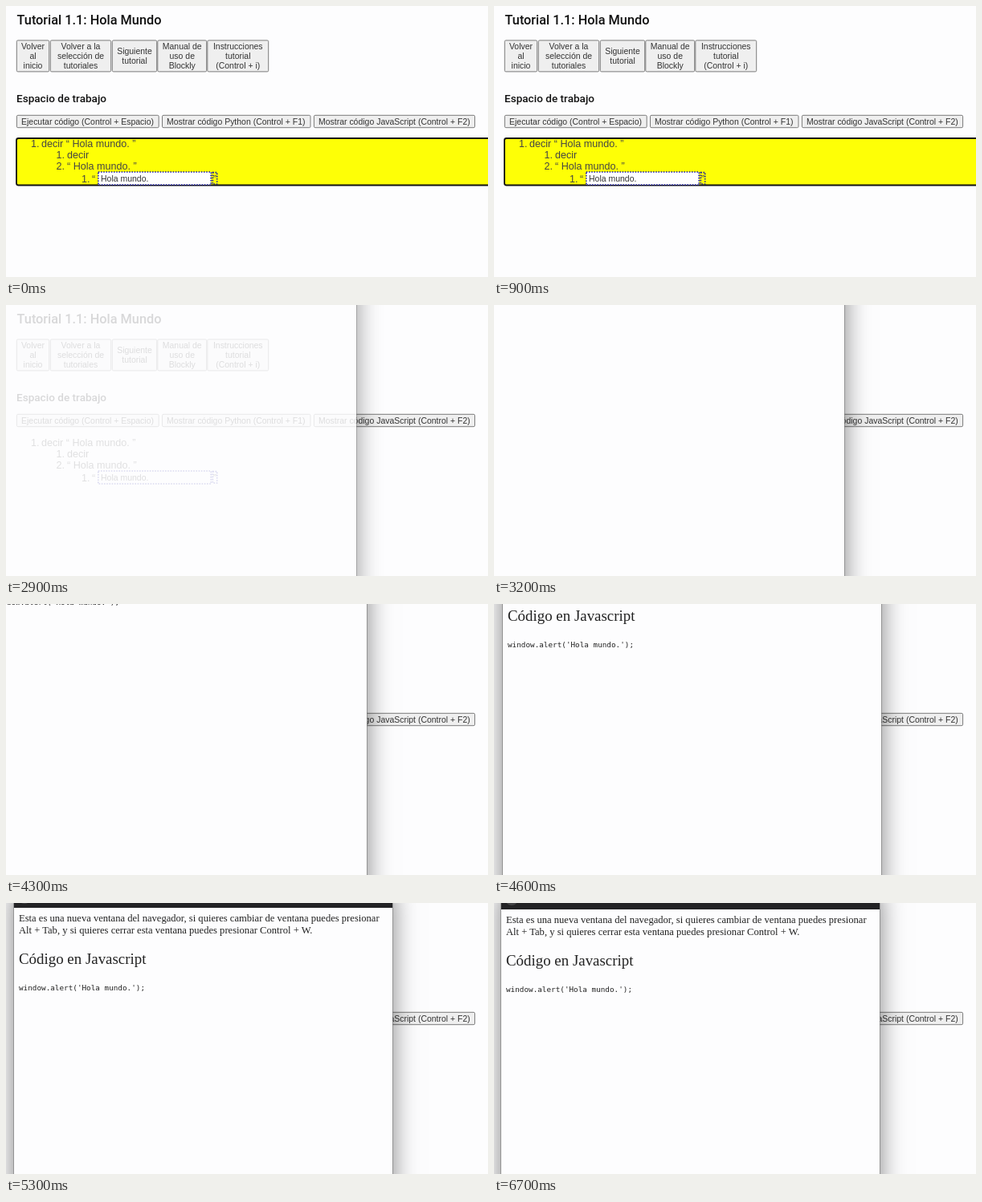
These frames come from a looping animation (600 px wide and 338 px high, 8000 ms). An HTML page:

```html
<!DOCTYPE html>
<html lang="es">
<head>
<meta charset="utf-8">
<title>Hola Mundo</title>
<style>
  html, body { margin: 0; width: 100%; height: 100%; overflow: hidden; background: #fdfdfe; }
  #stage { position: relative; width: 600px; height: 338px; overflow: hidden; background: #fdfdfe; }
  svg { position: absolute; left: 0; top: 0; overflow: visible; }
  text { white-space: pre; }
  .title { font-family: Roboto, sans-serif; font-weight: 500; fill: #111; }
  .label { font: 10.48px "Liberation Sans", Arial, sans-serif; fill: #333; }
  .list { font: 12.58px "Liberation Sans", Arial, sans-serif; fill: #444; }
  .serif { font-family: "Liberation Serif", "Times New Roman", serif; fill: #222; }
  .code { font: 9.32px "DejaVu Sans Mono", monospace; fill: #222; }
  .dots { stroke: #1c1ca0; stroke-width: 1.6; stroke-dasharray: 1.6 1.6; }
  #popup { position: absolute; left: 9px; top: -18px; width: 471px; height: 640px;
    background: #fdfdfe; box-shadow: 0 0 0 .6px #777, 0 4px 30px rgba(0, 0, 0, .5); }
  #popup svg { left: -9px; top: 18px; }
</style>
</head>
<body>
<div id="stage">
  <svg id="page" width="600" height="338"></svg>
  <div id="popup"><svg id="content" width="600" height="338"></svg></div>
</div>
<script>
const LOOP = 8000;
const $ = id => document.getElementById(id);

function add(parent, tag, attrs, text) {
  const el = document.createElementNS('http://www.w3.org/2000/svg', tag);
  for (const name in attrs) el.setAttribute(name, attrs[name]);
  if (text) el.textContent = text;
  parent.append(el);
  return el;
}

const page = $('page'), content = $('content'), popup = $('popup');
const write = (parent, cls, x, y, text, more) =>
  add(parent, 'text', { class: cls, x, y, ...more }, text);
const box = (x, y, width, height, more) =>
  add(page, 'rect', { x, y, width, height, ...more });

const plain = { fill: '#efefef', stroke: '#7a7a7a', rx: 1.5 };
const focus = { fill: '#feff06', stroke: '#111', 'stroke-width': 2, rx: 2.5 };

write(page, 'title', 13.5, 23, 'Tutorial 1.1: Hola Mundo', { 'font-size': 16.3 });
write(page, 'title', 13, 120, 'Espacio de trabajo', { 'font-size': 13.55 });

// Navigation buttons
const nav = [
  [13, 54, 'Volver|al|inicio'],
  [55, 131, 'Volver a la|selección de|tutoriales'],
  [132, 188, 'Siguiente|tutorial'],
  [188.5, 250, 'Manual de|uso de|Blockly'],
  [250.5, 327, 'Instrucciones|tutorial|(Control + i)']
];
for (const [left, right, label] of nav) {
  box(left + .3, 42.9, right - left - .6, 39, plain);
  const lines = label.split('|');
  lines.forEach((line, i) => write(page, 'label', (left + right) / 2,
    66.4 + 12 * (i - (lines.length - 1) / 2), line, { 'text-anchor': 'middle' }));
}

// Action buttons
const button = (x, width, style) => box(x, 136.3, width, 15.4, style);
button(13.4, 176.8, plain);
button(194.5, 184.5, plain);
button(383.4, 200.2, plain);
const buttonFocus = button(383.4, 200.2, focus);
write(page, 'label', 19, 147.6, 'Ejecutar código (Control + Espacio)');
write(page, 'label', 200, 147.6, 'Mostrar código Python (Control + F1)');
write(page, 'label', 389, 147.6, 'Mostrar código JavaScript (Control + F2)');

// Workspace
const workFocus = box(13, 165, 620, 58.5, { ...focus, 'stroke-width': 1.8 });
const list = [
  [31, 44, 176, '1.', 'decir “ Hola mundo. ”'],
  [62.5, 76, 190, '1.', 'decir'],
  [62.5, 76, 204, '2.', '“ Hola mundo. ”'],
  [94, 107, 219.5, '1.', '“']
];
for (const [markX, x, y, mark, text] of list) {
  write(page, 'list', markX, y, mark);
  write(page, 'list', x, y, text);
}
write(page, 'list', 257.8, 219.5, '”');
box(114.8, 207, 140.4, 16, { class: 'dots', fill: '#fff' });
box(257.3, 207.6, 5.4, 14.4, { class: 'dots', fill: 'none' });
write(page, 'label', 118, 219, 'Hola mundo.');

// Code window
add(content, 'rect', { x: 9, y: -18, width: 471, height: 26, fill: '#232325' });
add(content, 'circle', { cx: 22, cy: -5, r: 8, fill: '#444446' });
const size = n => ({ 'font-size': n });
write(content, 'serif', 15, 25.4, 'Esta es una nueva ventana del navegador, si quieres cambiar de ventana puedes presionar', size(12.58));
write(content, 'serif', 15, 39.6, 'Alt + Tab, y si quieres cerrar esta ventana puedes presionar Control + W.', size(12.58));
write(content, 'serif', 15, 78, 'Código en Javascript', size(18.9));
write(content, 'code', 15, 111, "window.alert('Hola mundo.');");

// Each step is [time, value], held until the next one
function hold(el, prop, steps) {
  const frames = steps.map(([time, value]) =>
    ({ offset: time / LOOP, [prop]: value, easing: 'steps(1, end)' }));
  frames.push({ offset: 1, [prop]: steps[steps.length - 1][1] });
  el.animate(frames, { duration: LOOP, iterations: Infinity });
}

hold(workFocus, 'opacity', [[0, 1], [1400, 0]]);
hold(buttonFocus, 'opacity', [[0, 0], [1400, 1], [2800, 0]]);
hold(popup, 'opacity', [[0, 0], [2800, .45], [2900, .85], [3000, 1]]);

const path = [
  [0, -44, -128], [4300, -31, -110], [4400, -16, -91], [4500, -5, -73], [4600, 2, -57],
  [4700, 3, -43], [4800, 3, -31], [4900, 3, -20], [5000, 3, -11], [5100, 3, -8],
  [5200, 2, -5], [5300, 1, -2], [5400, 0, -1], [5500, 0, 0]
];
hold(popup, 'transform', path.map(([time, x, y]) => [time, `translate(${x}px, ${y}px)`]));
</script>
</body>
</html>
```
